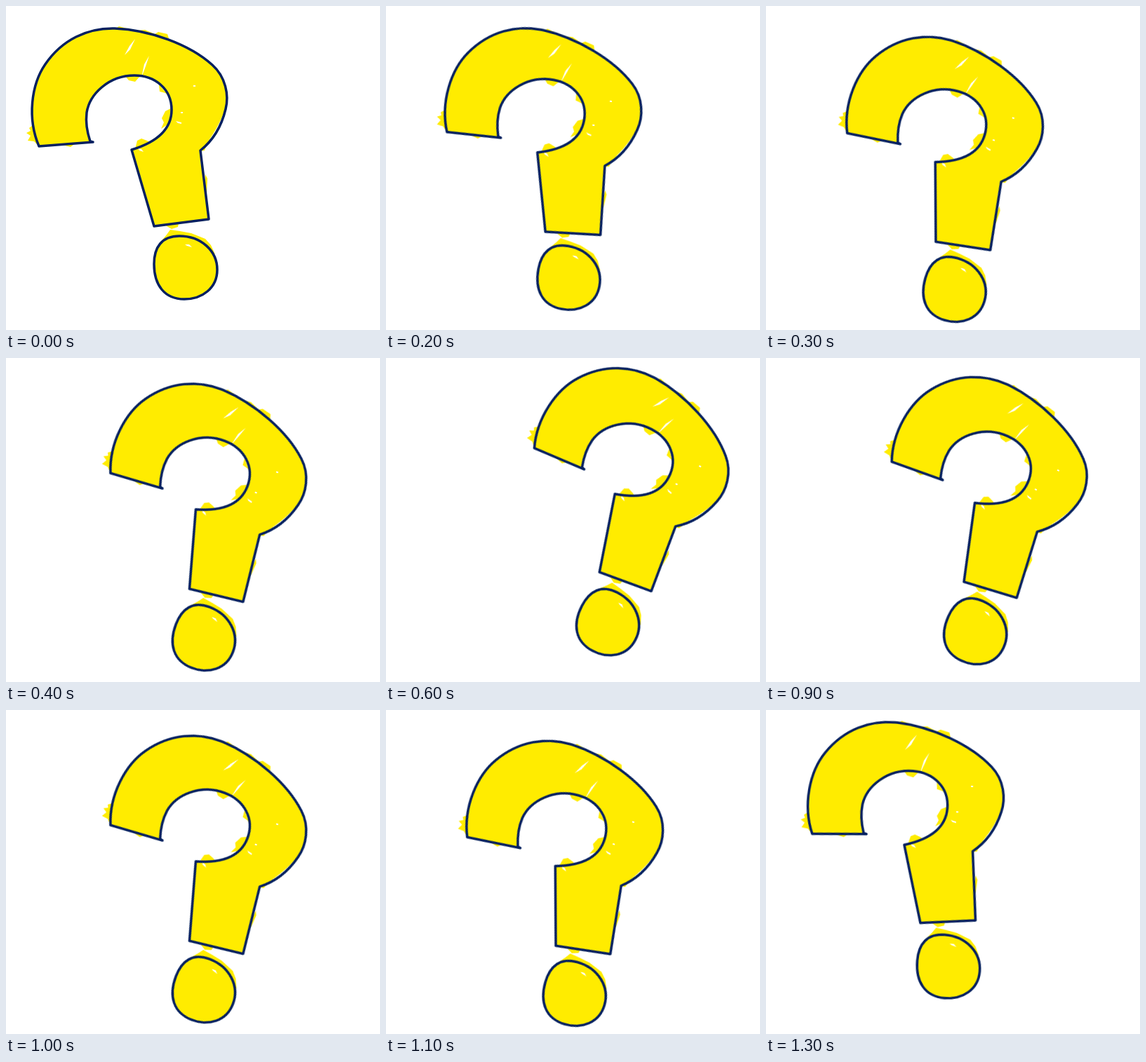
An HTML page that plays this animation: 533 by 462 pixels, repeating every 1400 ms.

```html
<!DOCTYPE html>
<html lang="en">
<head>
<meta charset="utf-8">
<title>Question mark</title>
<style>
  html, body { margin: 0; width: 100%; height: 100%; overflow: hidden; background: #fff; }
  svg { display: block; width: 100vw; height: 100vh; }
  .fill { fill: #ffec00; }
  .gap { fill: #fff; }
  .line { fill: none; stroke: #04205f; stroke-width: 3.5; stroke-linejoin: round; stroke-linecap: round; }
</style>
</head>
<body>
<svg viewBox="0 0 533 462">
  <defs>
    <path id="hook" d="M47 200C30 160 36 112 56 83C80 48 116 31 155 32C205 34 262 55 294 84C313 101 318 127 313 147C307 172 296 191 277 206L289 304L211 314L179 205C212 195 236 177 236 148C236 118 212 99 183 99C146 99 119 126 115 152C113 168 117 184 120 193L124 194Z"/>
    <path id="dot" d="M247 328C278 328 301 349 301 376C301 402 280 418 254 418C226 418 211 398 211 368C211 344 222 328 247 328Z"/>
  </defs>
  <g id="mark">
    <g transform="translate(-255 -373)">
      <g class="fill">
        <use href="#hook"/>
        <use href="#dot"/>
        <!-- marker overshoot -->
        <path d="M38 170L33 174L35 178L29 181L35 185L31 192L40 193L46 199Z"/>
        <path d="M155 33L161 29L176 33ZM188 35L198 34L212 40L217 37L230 40L232 46L222 46Z"/>
        <path d="M169 99L175 106L184 108L191 100ZM218 112L219 122L227 124L232 128ZM235 146L227 150L222 160L225 166L221 175L232 168Z"/>
        <path d="M184 204L187 192L193 189L201 192L206 195L192 203Z"/>
        <path d="M128 126L136 115L144 111ZM284 240L287 246L286 266L283 270ZM276 207L283 206L285 200Z"/>
        <path d="M226 312L236 318L245 315L246 310ZM80 198L92 201L100 195Z"/>
        <path d="M219 338L229 326L234 319L248 321L264 324L284 332L292 341L298 354L270 345Z"/>
      </g>
      <g class="gap">
        <path d="M184 47L176 57L169 70L177 62ZM204 71L197 83L193 102L199 86Z"/>
        <path d="M255 340L261 340L265 344L258 342ZM188 203L193 204L196 208L190 206Z"/>
        <path d="M267 113h3v2h-3ZM249 151h3v2h-3ZM242 164L250 166L250 168L245 167Z"/>
        <path d="M311 150C307 168 299 181 288 193C297 180 304 169 311 150ZM277 221l3 0l1 7l-3 0Z"/>
      </g>
      <use class="line" href="#hook"/>
      <use class="line" href="#dot"/>
    </g>
  </g>
</svg>
<script>
  // dot centre x, y and tilt in degrees, one pose per 100 ms
  const swing = [
    [255, 373, 0],
    [259, 366, 4.7],
    [259.5, 388, 10.6],
    [268, 405, 16],
    [281.5, 400, 20.9],
    [298, 391, 24.2],
    [316, 378, 27.5],
    [325, 369, 31]
  ];
  const poses = [...swing, ...swing.slice(1, -1).reverse(), swing[0]];

  const frames = poses.map(([x, y, tilt]) => ({
    transform: `translate(${x}px, ${y}px) rotate(${tilt}deg)`,
    easing: 'step-end'
  }));

  document.getElementById('mark').animate(frames, { duration: 1400, iterations: Infinity });
</script>
</body>
</html>
```
